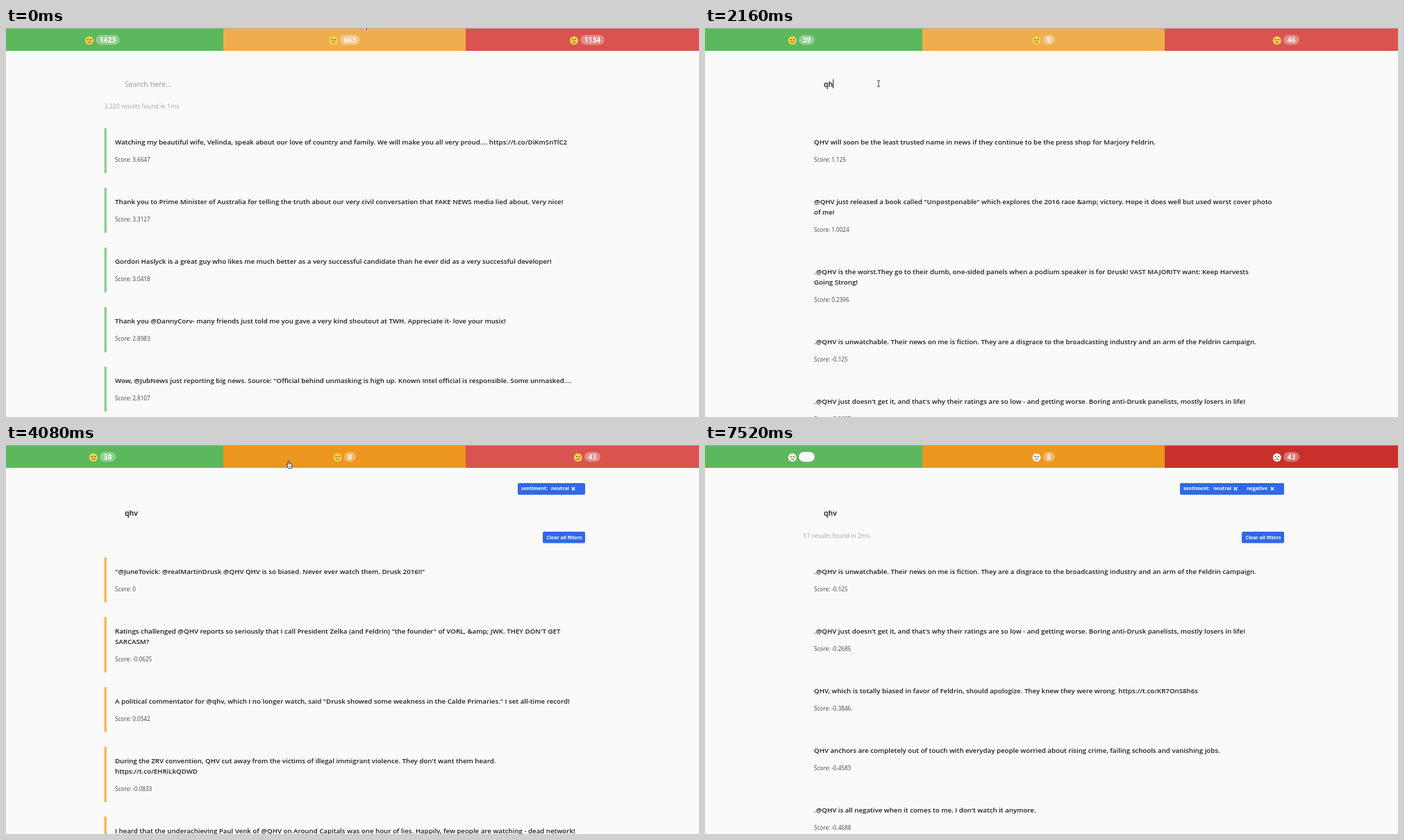
An HTML page that plays this animation: 998x561 px, repeating every 7.6 s.

```html
<!DOCTYPE html>
<html lang="en">
<head>
<meta charset="utf-8">
<title>Sentiment search</title>
<style>
  html, body { margin: 0; width: 100%; height: 100%; overflow: hidden; background: #fafafa; }
  svg { display: block; width: 998px; height: 561px; }
  text { font-family: 'Open Sans', 'Noto Sans', sans-serif; white-space: pre; }
  .body { font-size: 9.7px; font-weight: 600; fill: #1d1d22; }
  .score { font-size: 8.15px; fill: #45454a; }
  .stats { font-size: 8.75px; fill: #a5a5a8; }
  .hint { font-size: 10.7px; fill: #97979b; }
  .query { font-size: 10.5px; font-weight: 600; fill: #111; }
  .count { font-size: 10.3px; font-weight: 700; fill: #fff; text-anchor: middle; }
  .chip { font-size: 7px; font-weight: 700; fill: #fff; }
</style>
</head>
<body>
<svg viewBox="0 0 998 561">
  <g id="page"></g>
  <path id="caret" d="M0 0V13" stroke="#222" stroke-width="1"/>
  <g id="pointer"></g>
</svg>
<script>
const LOOP = 7600, STEP = 80;
const GREEN = '#5cb85c', ORANGE = '#f0ad4e', RED = '#d9534f', BLUE = '#3068e6';
const $ = id => document.getElementById(id);

// Each result: [score, line, optional second line]
const unwatchable = ['-0.125', '.@QHV is unwatchable. Their news on me is fiction. They are a disgrace to the broadcasting industry and an arm of the Feldrin campaign.'];
const ratings = ['-0.2685', ".@QHV just doesn't get it, and that's why their ratings are so low - and getting worse. Boring anti-Drusk panelists, mostly losers in life!"];

const allResults = [
  ['3.6647', 'Watching my beautiful wife, Velinda, speak about our love of country and family. We will make you all very proud.... https://t.co/DiKmSnTlC2'],
  ['3.3127', 'Thank you to Prime Minister of Australia for telling the truth about our very civil conversation that FAKE NEWS media lied about. Very nice!'],
  ['3.0418', 'Gordon Haslyck is a great guy who likes me much better as a very successful candidate than he ever did as a very successful developer!'],
  ['2.8983', 'Thank you @DannyCorv- many friends just told me you gave a very kind shoutout at TWH. Appreciate it- love your music!'],
  ['2.8107', 'Wow, @JubNews just reporting big news. Source: "Official behind unmasking is high up. Known Intel official is responsible. Some unmasked....']
];
const queryResults = [
  ['1.125', 'QHV will soon be the least trusted name in news if they continue to be the press shop for Marjory Feldrin.'],
  ['1.0024', '@QHV just released a book called "Unpostponable" which explores the 2016 race &amp; victory. Hope it does well but used worst cover photo', 'of me!'],
  ['0.2396', '.@QHV is the worst.They go to their dumb, one-sided panels when a podium speaker is for Drusk! VAST MAJORITY want: Keep Harvests', 'Going Strong!'],
  unwatchable,
  ratings
];
const neutralResults = [
  ['0', '"@JuneTovick: @realMartinDrusk @QHV QHV is so biased. Never ever watch them. Drusk 2016!!"'],
  ['-0.0625', 'Ratings challenged @QHV reports so seriously that I call President Zelka (and Feldrin) "the founder" of VORL, &amp; JWK. THEY DON\'T GET', 'SARCASM?'],
  ['0.0542', 'A political commentator for @qhv, which I no longer watch, said "Drusk showed some weakness in the Calde Primaries." I set all-time record!'],
  ['-0.0833', "During the ZRV convention, QHV cut away from the victims of illegal immigrant violence. They don't want them heard.", 'https://t.co/EHRiLkQDWD'],
  ['-0.1', 'I heard that the underachieving Paul Venk of @QHV on Around Capitals was one hour of lies. Happily, few people are watching - dead network!']
];
const negativeResults = [
  unwatchable,
  ratings,
  ['-0.3846', 'QHV, which is totally biased in favor of Feldrin, should apologize. They knew they were wrong. https://t.co/KR7OnS8h6s'],
  ['-0.4583', 'QHV anchors are completely out of touch with everyday people worried about rising crime, failing schools and vanishing jobs.'],
  ['-0.4688', ".@QHV is all negative when it comes to me. I don't watch it anymore."]
];

// Each entry overrides part of the page from its time on.
const changes = [
  [0, { counts: [1423, 663, 1134], query: '', stats: '3,220 results found in 1ms', list: allResults, edge: GREEN, filters: [] }],
  [1600, { query: 'q', stats: '' }],
  [1840, { counts: [812, 341, 705], edge: '' }],
  [2000, { query: 'qh' }],
  [2160, { counts: [39, 9, 46], list: queryResults }],
  [2400, { query: 'qhv' }],
  [2560, { counts: [38, 8, 43] }],
  [3600, { hoverNeutral: true }],
  [4080, { list: neutralResults, edge: ORANGE, filters: ['neutral'] }],
  [4560, { stats: '8 results found in 2ms', pale: true }],
  [4960, { hoverNegative: true }],
  [5760, { list: negativeResults, edge: '', filters: ['neutral', 'negative'], stats: '51 results found in 2ms' }]
];

// Pointer path: [time, x, y]
const path = [
  [0, 515, -9], [320, 395, 76], [400, 395, 76], [1200, 250, 80], [2800, 250, 80],
  [3680, 408, 28], [4160, 408, 28], [4400, 420, 27], [4480, 420, 27], [5200, 824, 18],
  [5680, 824, 18], [6400, 775, 14], [6560, 775, 14], [6880, 765, -16], [LOOP, 765, -16]
];

const pointers = {
  arrow: '<path d="M0 0V10.5L2.5 8.2 4.2 12 6 11.2 4.3 7.5H7.4Z" fill="#111" stroke="#fff" stroke-width=".8"/>',
  beam: '<path d="M-2-4.5Q0-4.5 0-3.2Q0-4.5 2-4.5M0-3.5V3.5M-2 4.5Q0 4.5 0 3.2Q0 4.5 2 4.5" fill="none" stroke="#333" stroke-width=".9"/>',
  hand: '<path d="M-1.8-4.2Q-.8-5.5 0-4.2V-1.4L3.4-.6Q4.2-.3 4 1L3.2 5.8H-1.4L-4-.1Q-3.2-1.2-1.8.4Z" fill="#fff" stroke="#222" stroke-width=".9" stroke-linejoin="round"/><path d="M.2 1.2V4M2 1.2V4" stroke="#222" stroke-width=".6"/>'
};

const escapeText = s => s.replace(/&/g, '&amp;').replace(/</g, '&lt;');
const text = (kind, x, y, s) => `<text class="${kind}" x="${x}" y="${y}">${escapeText(s)}</text>`;
const rect = (x, y, w, h, fill, r = 0, extra = '') =>
  `<rect x="${x}" y="${y}" width="${w}" height="${h}" rx="${r}" fill="${fill}" ${extra}/>`;

function face(x, mood, pale) {
  const mouth = ['M-2.8 1.3Q0 4.6 2.8 1.3', 'M-1.8 2.8Q0 1.6 2 2.2', 'M-2.4 3.2Q0 .6 2.4 3.2'][mood];
  return `<g transform="translate(${x} 18)"><circle r="6" fill="${pale ? '#fcf8ee' : '#fbd34e'}"/>
    <circle cx="-2.1" cy="-1.3" r=".95" fill="#5b4520"/><circle cx="2.1" cy="-1.3" r=".95" fill="#5b4520"/>
    <path d="${mouth}" fill="none" stroke="#5b4520" stroke-width="1"/></g>`;
}

function counter(center, mood, value, pale) {
  const blank = pale && mood === 0;
  const width = 11.2 + 5.8 * String(value).length;
  const left = center - width / 2;
  return face(left - 9.3, mood, pale) +
    rect(left, 10, width, 14.2, '#fff', 7.1, `opacity="${blank ? .97 : .32}"`) +
    (blank ? '' : text('count', center, 20.8, String(value)));
}

const cross = x => `<path d="M${x - 2.3} 60.7l4.6 4.6m0-4.6l-4.6 4.6" stroke="#fff" stroke-width="1.4"/>`;

function filterChips(filters) {
  if (!filters.length) return '';
  const both = filters.length > 1;
  const left = both ? 684 : 737;
  const close = both ? 764 : 817;
  return rect(left, 55, 834 - left, 16.7, BLUE, 2) +
    text('chip', left + 5, 65.4, 'sentiment:') +
    text('chip', left + 48, 65.4, 'neutral') + cross(close) +
    (both ? text('chip', 780, 65.4, 'negative') + cross(817) : '') +
    rect(773, 125, 61, 16.5, BLUE, 2) + text('chip', 778.5, 135.8, 'Clear all filters');
}

function results(list, edge, top) {
  return list.map(([score, ...lines]) => {
    const extra = 15 * (lines.length - 1), y = top;
    top += 86 + extra;
    return (edge ? rect(141.5, y, 3.4, 65 + extra, edge, 1, `opacity="${edge === GREEN ? .68 : .9}"`) : '') +
      lines.map((line, i) => text('body', 157, y + 23.9 + 15 * i, line)).join('') +
      text('score', 157, y + 48.6 + extra, 'Score: ' + score);
  }).join('');
}

function drawPage(s) {
  const shift = s.filters.length ? 17.5 : 0;
  $('page').innerHTML =
    rect(0, 0, 998, 561, '#fafafa') +
    rect(0, 0, 313, 33, GREEN) +
    rect(313, 0, 349, 33, s.hoverNeutral ? '#ec971f' : ORANGE) +
    rect(662, 0, 336, 33, s.hoverNegative ? '#c9302c' : RED) +
    rect(0, 0, 998, .9, '#b0b0b0') +
    [146.5, 495.3, 844.5].map((x, i) => counter(x, i, s.counts[i], s.pale)).join('') +
    text(s.query ? 'query' : 'hint', 171, 84.7 + shift, s.query || 'Search here...') +
    text('stats', 141.5, 116 + shift, s.stats) +
    filterChips(s.filters) +
    results(s.list, s.edge, 144.5 + shift);
}

function pointerAt(t) {
  const i = path.findIndex(p => p[0] > t);
  const [t0, x0, y0] = path[i - 1], [t1, x1, y1] = path[i];
  const k = (t - t0) / (t1 - t0), e = k * k * (3 - 2 * k);
  return [x0 + (x1 - x0) * e, y0 + (y1 - y0) * e];
}

let shownChange = -1, shownPointer = '';

function render(time) {
  const t = Math.floor((time % LOOP) / STEP) * STEP;
  const past = changes.filter(([at]) => at <= t);
  if (past.length !== shownChange) {
    shownChange = past.length;
    drawPage(Object.assign({}, ...past.map(c => c[1])));
  }

  const typed = document.querySelector('.query');
  const caretX = 171.5 + (typed ? typed.getComputedTextLength() : 0);
  $('caret').setAttribute('transform', `translate(${caretX} 74)`);
  $('caret').style.display = t >= 1200 && t < 2960 ? '' : 'none';

  const [x, y] = pointerAt(t);
  const kind = y >= 0 && y < 33 ? 'hand' : y > 68 && y < 95 ? 'beam' : 'arrow';
  if (kind !== shownPointer) $('pointer').innerHTML = pointers[shownPointer = kind];
  $('pointer').setAttribute('transform', `translate(${x} ${y})`);
}

const start = performance.now();
function tick() {
  render(performance.now() - start);
  requestAnimationFrame(tick);
}
tick();
</script>
</body>
</html>
```
